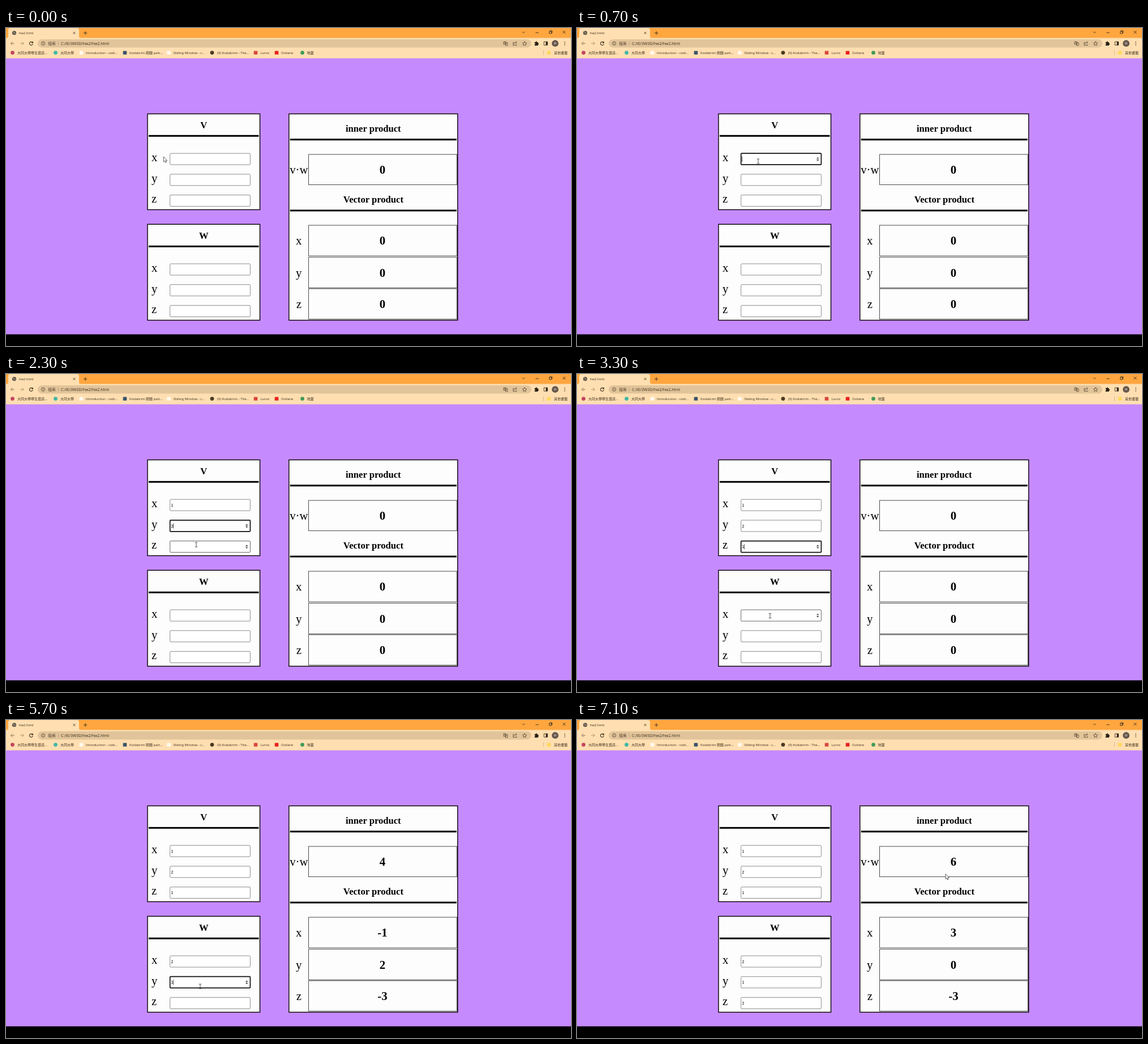
Animation, 998 px wide and 561 px high, one loop 8000 ms. Source, as an HTML page:

```html
<!DOCTYPE html>
<html lang="zh-Hant">
<head>
<meta charset="utf-8">
<title>hw2.html</title>
<style>
  html, body { margin: 0; width: 100%; height: 100%; overflow: hidden; background: #000; }
  svg { display: block; width: 998px; height: 561px; }
  text { white-space: pre; }
  .ui { font-family: "Open Sans", "Noto Sans CJK TC", "Noto Sans CJK JP", "Noto Sans CJK", sans-serif; fill: #3a2c1a; }
  .serif { font-family: "Liberation Serif", "Times New Roman", serif; }
  .entry { font: 6.93px "Liberation Sans", Arial, sans-serif; }
  .icon { fill: none; stroke: #3d2f1c; stroke-width: .9; }
</style>
</head>
<body>
<svg id="stage" viewBox="0 0 998 561"></svg>
<script>
const stage = document.getElementById('stage');
const LOOP = 8000, STEP = 100;

function add(tag, attrs, text) {
  const node = document.createElementNS('http://www.w3.org/2000/svg', tag);
  for (const key in attrs) node.setAttribute(key, attrs[key]);
  if (text !== undefined) node.textContent = text;
  stage.appendChild(node);
  return node;
}
const rect = (x, y, width, height, fill, more) => add('rect', { x, y, width, height, fill, ...more });
const dot = (cx, cy, r, fill, more) => add('circle', { cx, cy, r, fill, ...more });
const path = (d, more) => add('path', { d, class: 'icon', ...more });
const ui = (x, y, size, text, more) => add('text', { x, y, class: 'ui', 'font-size': size, ...more }, text);
const serif = (x, y, size, text, more) => add('text', { x, y, class: 'serif', 'font-size': size, ...more }, text);
const centred = { 'text-anchor': 'middle', 'font-weight': 'bold' };

function drawTabs() {
  rect(0, 0, 998, 19, '#ffa63f');
  path('M1 18Q4 18 4 14V4Q4 0 8 0H125Q129 0 129 4V14Q129 18 132 18Z', { style: 'fill:#ffdfb1;stroke:none' });
  dot(14.5, 8.7, 3.6, '#5a5148');
  path('M12 7.5Q14 6 15 8T17 9.5M13 11L14.5 9.5', { style: 'stroke:#e9d2ae;stroke-width:.8' });
  ui(23, 10.8, 5.8, 'hw2.html');
  path('M118.6 6.8l3.8 3.8m0-3.8l-3.8 3.8M140.2 5.6v6.4m-3.2-3.2h6.4');
  path('M911.8 6.4l2.4 2.4 2.4-2.4M935.4 8.3h5.4M983.4 4.8l5 5m0-5l-5 5');
  path('M959.6 6h3.8v3.8h-3.8zM960.8 6v-1.2h3.8v3.8h-1.2');
}

function drawToolbar() {
  rect(0, 17.5, 998, 36, '#ffdfb1');
  rect(56, 20, 872, 14.4, '#e2c49a', { rx: 7.2 });
  path('M14.8 27.2h-6.2m2.9-3l-3 3 3 3', { style: 'stroke:#7d6a50' });
  path('M25 27.2h6.2m-2.9-3l3 3-3 3', { style: 'stroke:#a58d6c' });
  path('M46.9 25.6A3 3 0 1 0 47.4 28M47.4 23.8v2.4h-2.5', { style: 'stroke-width:1.1' });
  dot(65.6, 27.2, 3.1, 'none', { class: 'icon', style: 'stroke-width:.7' });
  path('M65.6 26.8v2.1M65.6 25.1v.8', { style: 'stroke-width:.8' });
  ui(74, 29.8, 6.9, '檔案', { style: 'fill:#66543c' });
  path('M92.5 23.5v7.4', { style: 'stroke:#a88d66;stroke-width:.6' });
  ui(97, 29.7, 6.9, 'C:/IE/3W3D/hw2/hw2.html');

  path('M879 24.2h4v4.6h-4zM882 26h4v4.8h-3.4zM880 26h2', { style: 'stroke-width:.7' });
  path('M897.5 25.4h-1.6v5h6v-1.8M897.4 28.4q.6-3.2 4.4-3m-1.6-1.8l1.9 1.8-1.9 1.8', { style: 'stroke-width:.7' });
  path('M916 23.6l1.1 2.4 2.6.3-1.9 1.8.5 2.6-2.3-1.3-2.3 1.3.5-2.6-1.9-1.8 2.6-.3z', { style: 'stroke-width:.7' });
  path('M933.6 25h2q0-1.8 1.1-1.8t1.1 1.8h2v2q1.4 0 1.4 1.1t-1.4 1.1v1.7h-6.2v-2q1.3 0 1.3-1t-1.3-1z', { style: 'fill:#2b2116;stroke:none' });
  path('M950.2 24.2h6.2v6h-6.2z');
  rect(953.6, 24.2, 3, 6, '#2b2116');
  dot(970, 27.2, 5.9, '#66574c');
  ui(970, 29.1, 5.2, 'W', { 'text-anchor': 'middle', style: 'fill:#eee4d8' });
  for (const y of [24.4, 27.2, 30]) dot(987, y, .75, '#2b2116');
}

function drawBookmarks() {
  // [icon x, icon colour, round, text x, text]
  const marks = [
    [11.5, '#c4455f', 1, 20, '大同大學學生資訊...'],
    [87.5, '#3fb7a6', 1, 96, '大同大學'],
    [133, '#fffaf0', 0, 141, 'Introduction - codi...'],
    [210, '#38536b', 0, 218, 'Kodabrim 刷題 patt...'],
    [287.5, '#fffaf0', 0, 295.5, 'Sliding Window - c...'],
    [364, '#4a3a22', 1, 373, '(9) Kodabrim - The...'],
    [441, '#d9483b', 0, 449.5, 'Lurvo'],
    [478, '#e8211d', 0, 486, 'Ovilane'],
    [523.5, '#3f9b58', 1, 531.5, '地圖'],
    [959, '#ffd75e', 0, 968, '其他書籤']
  ];
  for (const [x, colour, round, tx, label] of marks) {
    if (round) dot(x, 43.6, 3.4, colour);
    else rect(x - 3.3, 40.4, 6.6, 6.4, colour, { rx: .6 });
    ui(tx, 45.8, 6, label);
  }
  path('M949.5 39.5v8', { style: 'stroke:#c9a877;stroke-width:.7' });
}

function drawPanel(x, y, w, h, lines) {
  rect(x, y, w, h, '#fdfdfd', { stroke: '#000', 'stroke-width': 1.4 });
  for (const [title, ty] of lines) {
    serif(x + w / 2, ty, 16.63, title, centred);
    rect(x + 2, ty + 12.3, w - 4, 3, '#000');
  }
}

const inputs = [];
function drawInputs(top) {
  ['x', 'y', 'z'].forEach((name, i) => {
    const y = top + 36.7 * i;
    serif(257, y + 13.8, 20.8, name);
    inputs.push({
      y,
      frame: rect(289.7, y, 141.7, 20, '#fff', { rx: 1.4 }),
      text: add('text', { x: 291.6, y: y + 12.6, class: 'entry' }),
      spin: path(`M422.9 ${y + 9.3}l2.3-2.6 2.3 2.6zM422.9 ${y + 10.9}l2.3 2.6 2.3-2.6z`, { style: 'fill:#444;stroke:none' })
    });
  });
}

const results = [];
function drawResult(label, top, height, base) {
  serif(517.3, base, 20.8, label, { 'text-anchor': 'middle' });
  rect(534.5, top, 262, height, 'none', { stroke: '#4a4a4a', 'stroke-width': 1 });
  results.push(serif(665, base, 20.8, '0', centred));
}

rect(0, 53, 998, 487.4, '#c68aff');
drawTabs();
drawToolbar();
drawBookmarks();
drawPanel(250, 151.5, 198.5, 169, [['V', 176.5]]);
drawPanel(250, 346.3, 198.5, 169.2, [['W', 371.5]]);
drawPanel(499.8, 151.5, 298, 364, [['inner product', 183], ['Vector product', 308.2]]);
drawInputs(221.2);
drawInputs(416);
drawResult('v·w', 223, 53.5, 256.8);
drawResult('x', 348, 54, 382);
drawResult('y', 404.3, 54.2, 438.6);
drawResult('z', 460, 53.6, 493.8);

const caret = rect(0, 0, .8, 9, '#222');
const arrow = path('M0 0V9.2L2.1 7.3 3.5 10.5 4.9 9.9 3.5 6.8H6.2Z', { style: 'fill:#fff;stroke:#222;stroke-width:.7' });
const beam = path('M-2.3-4H-.5L0-3.6.5-4H2.3M0-3.6V3.6M-2.3 4H-.5L0 3.6.5 4H2.3', { style: 'stroke:#222;stroke-width:.8' });

// [time, focused input or -1, typed value]
const edits = [
  [600, 0, ''], [1300, 0, '1'], [1700, 1, ''], [2100, 1, '2'],
  [2500, 2, ''], [2900, 2, '1'], [3500, 3, ''], [3900, 3, '2'],
  [4000, 3, '21'], [4900, 3, '2'], [5400, 4, ''], [5700, 4, '1'],
  [6100, 5, ''], [6500, 5, '2'], [6900, -1, '']
];

// [time, x, y]
const moves = [
  [0, 278.5, 227], [600, 320, 235], [1300, 320, 235], [1700, 329, 269],
  [2100, 330, 270], [2300, 336, 301], [2500, 338, 305], [3000, 338, 305],
  [3300, 341, 426.5], [3900, 341, 426.5], [4100, 339.3, 464.3], [4500, 339.3, 464.3],
  [4600, 339, 465], [5200, 340, 466], [5500, 343, 470], [5700, 343, 470],
  [6100, 345, 499], [6500, 345, 499], [6900, 688, 300], [7100, 651, 271.5], [LOOP, 651, 271.5]
];

function pointerAt(t) {
  const i = moves.findIndex(m => m[0] > t);
  const [t0, x0, y0] = moves[i - 1], [t1, x1, y1] = moves[i];
  const k = (t - t0) / (t1 - t0), e = k * k * (3 - 2 * k);
  return [x0 + (x1 - x0) * e, y0 + (y1 - y0) * e];
}

function render(t) {
  const values = Array(6).fill('');
  let focus = -1, last = 0;
  for (const [time, input, value] of edits) {
    if (time > t) break;
    focus = input;
    last = time;
    if (input >= 0) values[input] = value;
  }

  const [px, py] = pointerAt(t);
  const hover = inputs.findIndex(({ y }) => px > 289 && px < 432 && py > y && py < y + 20.5);
  inputs.forEach(({ frame, text, spin }, i) => {
    const active = i === focus;
    frame.setAttribute('stroke', active ? '#101010' : i === hover ? '#555' : '#808080');
    frame.setAttribute('stroke-width', active ? 1.7 : .9);
    text.textContent = values[i];
    spin.style.display = active || i === hover ? '' : 'none';
  });

  const blinkOn = focus >= 0 && Math.floor((t - last) / 500) % 2 === 0;
  caret.style.display = blinkOn ? '' : 'none';
  if (blinkOn) {
    caret.setAttribute('x', 291.3 + 3.85 * values[focus].length);
    caret.setAttribute('y', inputs[focus].y + 5.6);
  }

  const [a, b, c, d, e, f] = values.map(Number);
  const products = [a * d + b * e + c * f, b * f - c * e, c * d - a * f, a * e - b * d];
  // Nothing is computed until the second vector has a value
  results.forEach((node, i) => { node.textContent = d ? products[i] : 0; });

  arrow.style.display = hover < 0 ? '' : 'none';
  beam.style.display = hover < 0 ? 'none' : '';
  (hover < 0 ? arrow : beam).setAttribute('transform', `translate(${px} ${py})`);
}

const start = performance.now();
function tick() {
  const t = (performance.now() - start) % LOOP;
  render(Math.floor(t / STEP) * STEP);
  requestAnimationFrame(tick);
}
tick();
</script>
</body>
</html>
```
